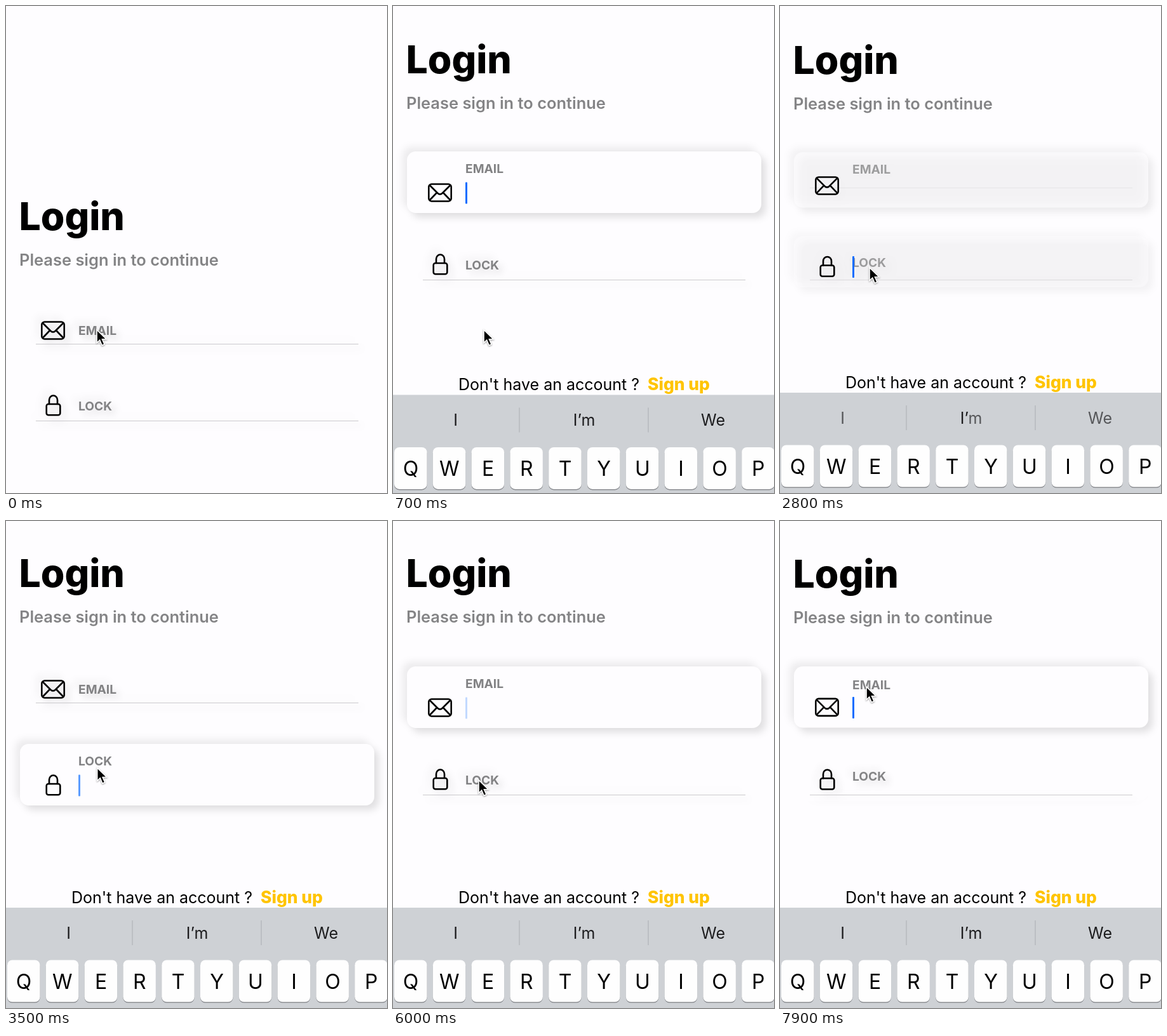
An HTML page for the animation above (8 s loop, 600 px wide and 767 px high).

```html
<!DOCTYPE html>
<html lang="en">
<head>
<meta charset="utf-8">
<title>Login form</title>
<style>
  html, body { margin: 0; width: 100%; height: 100%; overflow: hidden; background: #fefdff; }
  svg { display: block; font-family: Inter, Roboto, sans-serif; }
  .title { font-size: 60.7px; font-weight: 800; }
  .sub { font-size: 25.45px; font-weight: 600; fill: #848486; }
  .label { font-size: 19.2px; font-weight: 700; fill: #828284; }
  .foot, .hint { font-size: 25px; }
  .signup { font-size: 26.4px; font-weight: 800; fill: #ffc400; }
  .hint, .key { text-anchor: middle; }
  .hint { fill: #1c1c1e; }
  .key { font-size: 32px; }
  .icon { fill: none; stroke: #000; stroke-width: 2.6; stroke-linejoin: round; stroke-linecap: round; }
  .row { filter: drop-shadow(7px 7px 6px #0000001e) drop-shadow(-7px -7px 6px #00000012); }
  #mouse { filter: drop-shadow(0 1px 1px #0006); }
</style>
</head>
<body>
<svg width="600" height="767" viewBox="0 0 600 767">
  <g id="head">
    <text class="title" x="20.5" y="104">Login</text>
    <text class="sub" x="21" y="160">Please sign in to continue</text>
  </g>

  <g class="row" id="email">
    <rect class="card" x="22" width="558" rx="14" fill="#fefdff"/>
    <rect class="line" x="47" width="508" height="1" fill="#cbcacd"/>
    <g class="icon">
      <rect x="-17.7" y="-13.5" width="35.4" height="27" rx="4.5"/>
      <path d="M-16-11.5 -3.5 1Q0 4 3.5 1L16-11.5M-16 11.5-5 0M16 11.5 5 0"/>
    </g>
    <text class="label" x="114">EMAIL</text>
    <rect class="caret" x="114" width="3" height="34" rx="1" fill="#0a6cff"/>
  </g>

  <g class="row" id="lock">
    <rect class="card" x="22" width="558" rx="14" fill="#fefdff"/>
    <rect class="line" x="47" width="508" height="1" fill="#cbcacd"/>
    <g class="icon">
      <rect x="-10.3" y="-2" width="21.6" height="17.3" rx="3"/>
      <path d="M-6-2V-8.5a6.5 7 0 0 1 13 0V-2"/>
    </g>
    <text class="label" x="114">LOCK</text>
    <rect class="caret" x="114" width="3" height="34" rx="1" fill="#0a6cff"/>
  </g>

  <g id="foot" class="foot">
    <text x="103" y="602">Don't have an account ?</text>
    <text class="signup" x="401" y="602">Sign up</text>
  </g>

  <g id="keyboard">
    <rect y="609" width="600" height="520" fill="#ced1d5"/>
    <path d="M199 629v39M402 629v39" stroke="#b3b6ba" stroke-width="1.3"/>
    <text class="hint" x="98.5" y="658"><tspan class="dim">I</tspan></text>
    <text class="hint" x="301" y="658">I’<tspan class="dim">m</tspan></text>
    <text class="hint" x="504" y="658"><tspan class="dim">We</tspan></text>
    <g id="keys"></g>
  </g>

  <path id="mouse" d="M0 0V20.5L4.6 16.2 8.2 24.5 12 22.8 8.5 14.8H15Z" stroke="#fff" stroke-width="1.6"/>
</svg>
<script>
const LOOP = 8000, STEP = 100, FADE = 350, LABEL_LAG = 70;
const $ = s => document.querySelector(s);
const clamp = x => Math.max(0, Math.min(1, x));
const lerp = (a, b, p) => a + (b - a) * p;
const ramp = (t, a, b) => clamp((t - a) / (b - a));
const ease = x => { x = clamp(x); return x * x * (3 - 2 * x); };
const hump = (t, a, b) => Math.sin(Math.PI * ramp(t, a, b));
const set = (el, attrs) => { for (const k in attrs) el.setAttribute(k, attrs[k]); };
const shift = (el, x, y) => set(el, { transform: `translate(${x} ${y})` });

// Times at which the focus jumps; fields alternate, email first.
const taps = [317, 2653, 4285, 6350, 7580];

// Pointer stops: time, x, y
const stops = [
  [0, 143, 510], [1150, 143, 510], [1300, 146, 495], [1900, 147, 470], [2500, 141, 412],
  [3300, 141, 412], [4100, 158, 263], [4700, 158, 263], [5700, 135, 408],
  [6800, 135, 408], [7500, 136, 261], [LOOP, 136, 261]
];

$('#keys').innerHTML = [...'QWERTYUIOP'].map((c, i) => {
  const x = 2 + i * 60.8;
  return `<rect x="${x}" y="693" width="51.5" height="66" rx="8" fill="#8b8d91"/>
    <rect x="${x}" y="691.5" width="51.5" height="66" rx="8" fill="#fefefe"/>
    <text class="key" x="${x + 26}" y="737">${c}</text>`;
}).join('');

const parts = id => Object.fromEntries(
  ['card', 'line', 'icon', 'label', 'caret'].map(c => [c, $(`#${id} .${c}`)]));

// Each pair is [resting, focused].
const fields = [
  { el: parts('email'), icon: [265, 294], label: [265, 256], top: [232, 229], bottom: [304, 326], line: 286 },
  { el: parts('lock'), icon: [407, 416], label: [408, 378], top: [370, 351], bottom: [440, 448], line: 431 }
];

const tapIndex = t => taps.findLastIndex(s => t >= s);

function focus(field, t) {
  const i = tapIndex(t);
  if (i < 0 || (i === 0 && field === 1)) return 0;
  const p = ease((t - taps[i]) / FADE);
  return i % 2 === field ? p : 1 - p;
}

function blink(ms) {
  const s = ms / 1000 % 1;
  return ms < 550 ? 1 : s < .64 ? 1 - ramp(s, .55, .64) : ramp(s, .64, .95);
}

function drawField(n, t, rise) {
  const f = fields[n], { el } = f, p = focus(n, t), late = focus(n, t - LABEL_LAG);
  const opening = n === 0 && t < taps[1];
  const move = (n === 0 ? 246 : 222) * rise;
  const size = opening ? 1 : p;
  const top = lerp(...f.top, size), iconY = lerp(...f.icon, p) + move;

  set(el.card, { y: top + 222 * rise, height: lerp(...f.bottom, size) - top, opacity: p });
  set(el.line, { y: f.line + move, opacity: opening ? 1 - ramp(t, 320, 480) : 1 - p });
  shift(el.icon, 74, iconY);
  set(el.label, {
    y: lerp(...f.label, late) + move + 7,
    opacity: opening ? 1 - ramp(t, 320, 440) + ramp(t, 520, 680) : 1 - .25 * Math.sin(Math.PI * p)
  });

  const i = tapIndex(t), active = i >= 0 && i % 2 === n;
  set(el.caret, { y: iconY - 16.5, opacity: active ? blink(t - taps[i]) : 0 });
}

function draw(t) {
  // Critically damped spring for everything tied to the keyboard.
  const w = Math.max(0, t - 283) * .017, spring = (1 + w) * Math.exp(-w);
  const rise = 1 - ease((t - taps[0]) / FADE);

  const i = tapIndex(t), since = i > 0 ? t - taps[i] : 0, onLock = i % 2 === 1;
  const bob = onLock ? 3 * hump(since, 0, 350) : 2 * hump(since, 250, 550);
  shift($('#head'), 0, 249 * spring + bob);
  shift($('#foot'), 0, 498 * spring);
  shift($('#keyboard'), 0, 513 * spring);

  const dim = onLock ? 1 - .35 * hump(since, 0, 400) : 1;
  document.querySelectorAll('.dim').forEach(el => set(el, { 'fill-opacity': dim }));

  drawField(0, t, rise);
  drawField(1, t, rise);

  const k = stops.findIndex(s => s[0] > t), a = stops[k - 1], b = stops[k];
  const p = ease(ramp(t, a[0], b[0]));
  shift($('#mouse'), lerp(a[1], b[1], p), lerp(a[2], b[2], p));
}

function tick() {
  // Ten pictures a second.
  draw(Math.floor((performance.now() % LOOP + 4) / STEP) * STEP % LOOP);
  requestAnimationFrame(tick);
}
tick();
</script>
</body>
</html>
```
